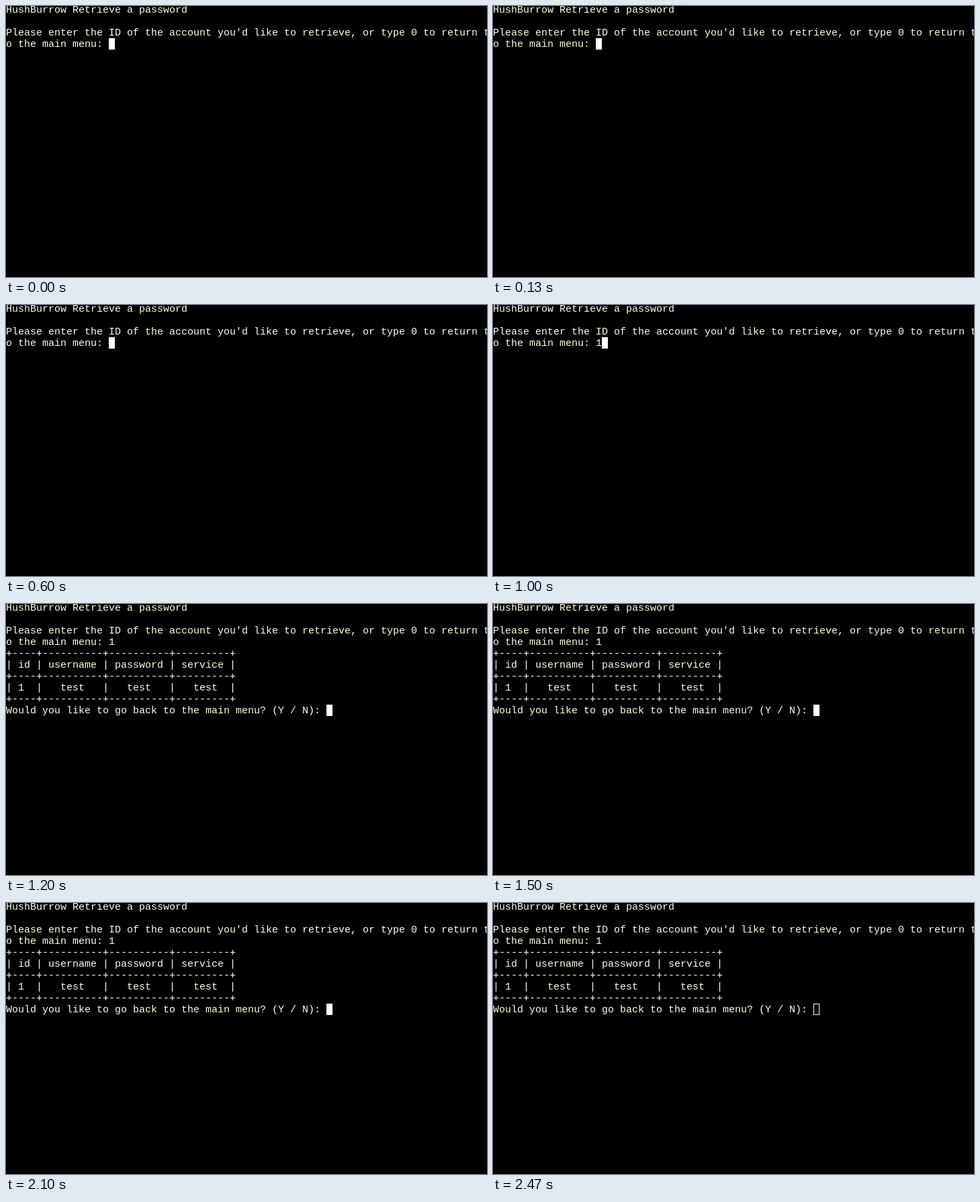
Animation, 716 px wide and 404 px high, one loop 2.51 s. Source, as an HTML page with a canvas:

```html
<!DOCTYPE html>
<html lang="en">
<head>
<meta charset="utf-8">
<title>Retrieve a password</title>
<style>
  html, body { margin: 0; background: #000; overflow: hidden; }
  canvas { display: block; }
</style>
</head>
<body>
<canvas id="screen" width="716" height="404"></canvas>
<script>
const ctx = document.getElementById('screen').getContext('2d', { alpha: false });
const LOOP = 2510, TYPED = 760, ANSWERED = 1030, BLURRED = 2370;
const CELL = 9, LINE = 17;

const rule = '+----+----------+----------+---------+';
const prompt = [
  'HushBurrow Retrieve a password',
  '',
  "Please enter the ID of the account you'd like to retrieve, or type 0 to return t",
  'o the main menu: '
];
const answer = [
  rule,
  '| id | username | password | service |',
  rule,
  '| 1  |   test   |   test   |   test  |',
  rule,
  'Would you like to go back to the main menu? (Y / N): '
];

function linesAt(t) {
  const lines = [...prompt];
  if (t >= TYPED) lines[3] += '1';
  return t >= ANSWERED ? lines.concat(answer) : lines;
}

function drawCursor(column, row, hollow) {
  const x = column * CELL, y = row * LINE - 3;
  ctx.fillStyle = ctx.strokeStyle = '#fff';
  if (hollow) ctx.strokeRect(x + 0.5, y + 0.5, CELL - 1, LINE - 1);
  else ctx.fillRect(x, y, CELL, LINE);
}

function draw(now) {
  const t = now % LOOP;
  const lines = linesAt(t);
  ctx.fillStyle = '#000';
  ctx.fillRect(0, 0, 716, 404);
  ctx.font = '15px "Liberation Mono", "Courier New", monospace';
  ctx.fillStyle = '#ffffe0';
  lines.forEach((text, row) => ctx.fillText(text, 0, row * LINE + 10));
  const last = lines.length - 1;
  drawCursor(lines[last].length, last, t >= BLURRED);
  requestAnimationFrame(() => draw(performance.now() - start));
}

const start = performance.now();
draw(0);
</script>
</body>
</html>
```
